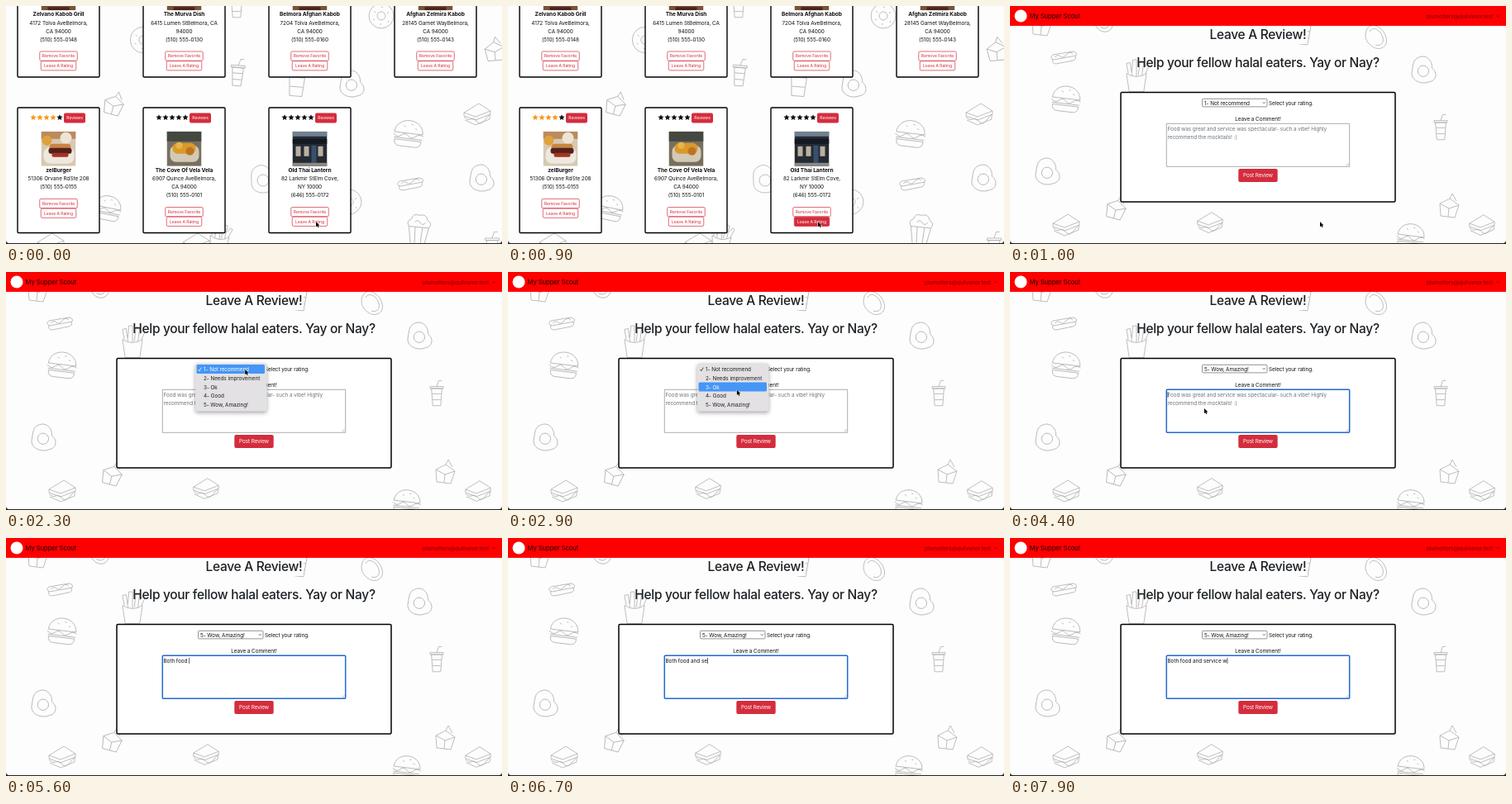
Animation of 600 by 288 pixels, one loop 8000 ms. Source, as an HTML page with a canvas:

```html
<!DOCTYPE html>
<html lang="en">
<head>
<meta charset="utf-8">
<title>Leave a review</title>
<style>
html, body { margin: 0; width: 100%; height: 100%; overflow: hidden; background: #fff; }
canvas { display: block; width: 600px; height: 288px; }
</style>
</head>
<body>
<canvas id="stage"></canvas>
<script>
const W = 600, H = 288, LOOP = 8000, STEP = 100;
const RED = '#d42d3d', INK = '#111', PAGE = '#fdfdfd';
const canvas = document.getElementById('stage');
const dpr = window.devicePixelRatio || 1;
canvas.width = W * dpr;
canvas.height = H * dpr;
const c = canvas.getContext('2d');

const clamp = v => Math.max(0, Math.min(1, v));
const ease = v => v * v * (3 - 2 * v);

function text(str, x, y, o = {}) {
  const { size = 6.4, weight = 400, color = INK, align = 'left', track = -0.01 } = o;
  c.font = `${weight} ${size}px Inter, "Open Sans", sans-serif`;
  c.letterSpacing = track * size + 'px';
  c.textAlign = align;
  c.fillStyle = color;
  c.fillText(str, x, y + size * 0.36);
  return c.measureText(str).width;
}

function box(x, y, w, h, r, fill, stroke, line = 1) {
  c.beginPath();
  c.roundRect(x, y, w, h, r);
  if (fill) { c.fillStyle = fill; c.fill(); }
  if (stroke) { c.strokeStyle = stroke; c.lineWidth = line; c.stroke(); }
}

function disc(x, y, r, fill) {
  c.beginPath();
  c.arc(x, y, r, 0, Math.PI * 2);
  c.fillStyle = fill;
  c.fill();
}

function line(path, color, width) {
  c.strokeStyle = color;
  c.lineWidth = width;
  c.stroke(new Path2D(path));
}

// Background doodles, each drawn around its own centre.
const doodles = {
  burger: 'M-16 0C-15-19 15-19 16 0ZM-17 2Q-12 7-8 3T0 3T8 3T17 2M-16 6H16M-15 8Q-15 15-9 15H9Q15 15 15 8ZM-6-8l2 1M2-10h2M7-6l2 1',
  fries: 'M-11-4L-8 16H8L11-4Q0 3-11-4ZM-9-4L-11-15L-7-16L-5-2M-5-6L-4-19H0V-1M2-2L4-18L8-17L6-2M8-10L12-15L14-13L10-4',
  egg: 'M-10-15C0-22 9-12 9-5C18-1 18 10 9 13C0 19-16 16-15 3C-15-3-17-11-10-15ZM6 1A7 7 0 1 1-8 1A7 7 0 1 1 6 1',
  carton: 'M-10-5L2-11L13-3L8 12L-9 10ZM-10-5L1 1L13-3M1 1L0 11M2-11L5-17L10-8',
  sandwich: 'M-16-3L2-14L16-5L-2 2ZM-16-3V1L-2 6L16-1V-5M-16 2Q-12 7-8 5T0 8T10 5T16 1M-15 6L-2 12L15 5V1',
  drink: 'M-8-10H8L6 16H-6ZM-10-13H10V-10H-10ZM0-13L3-22H8M-7-2H7M-6 7H6',
  donut: 'M15 0A15 15 0 1 1-15 0A15 15 0 1 1 15 0M5 0A5 5 0 1 1-5 0A5 5 0 1 1 5 0M-9-6l2 2M0-11l2 1M9-5l-2 2M8 6l1 2M-2 10h2M-10 4l2 1',
  hotdog: 'M-13-3L11-7Q17-6 15-2L-12 3Q-18 1-13-3ZM-13 2Q-15 8-9 8L11 4Q16 3 14-2M-11 0Q-7-4-4-1T3-3T11-4',
  popcorn: 'M-11-4L-7 18H7L11-4ZM-4-4L-3 18M4-4L3 18M-11-4Q-15-10-9-12Q-8-19-1-17Q7-20 9-12Q15-10 11-4M-5-9q3-4 6 0t6-1',
  potato: 'M-12-8C-8-20 8-14 12 0C15 12 4 16-3 12C-11 8-15 0-12-8ZM-8-7C-5-14 5-10 8 0C10 8 4 11-1 9'
};

function doodle([kind, x, y, scale = 1, turn = 0]) {
  c.save();
  c.translate(x, y);
  c.rotate(turn);
  c.scale(scale, scale);
  line(doodles[kind], '#a8a8a8', 0.75 / scale);
  c.restore();
}

const listArt = [
  ['donut', 166, 41, 1.05], ['drink', 279, 1, 0.8], ['donut', 454, 12],
  ['carton', 590, 55, 1, -0.2], ['drink', 280, 83, 0.85, 0.08], ['drink', 352, 89, 1.25, 0.08],
  ['carton', 129, 120, 1, 0.15], ['egg', 419, 95, 0.95, 0.2], ['burger', 487, 154, 1.08, 0.12],
  ['sandwich', 570, 132], ['hotdog', 489, 215], ['egg', 576, 209, 0.95, 0.2],
  ['egg', 312, 210], ['donut', 415, 237], ['burger', 123, 244, 1, 0.2],
  ['popcorn', 499, 272, 1.1, 0.1], ['fries', 258, 283, 1.05, 0.1],
  ['sandwich', 54, 289], ['sandwich', 230, 289], ['drink', 588, 292, 0.85]
];
const formArt = [
  ['carton', 37, 24], ['potato', 113, 17, 1, 0.3], ['hotdog', 65, 62], ['fries', 153, 86, 1.1],
  ['burger', 68, 112, 1.05, 0.12], ['egg', 46, 201, 0.95, 0.2], ['carton', 127, 246, 1, 0.15],
  ['sandwich', 68, 266], ['sandwich', 242, 263, 0.95], ['drink', 356, 32, 0.9, 0.1],
  ['potato', 443, 38], ['egg', 501, 78, 0.95, 0.2], ['drink', 521, 149, 0.8],
  ['carton', 530, 244], ['sandwich', 571, 266, 0.95], ['burger', 485, 278, 1, 0.12]
];

function button(label, x, y, w, fillAmount = 0) {
  box(x - w / 2, y - 5.6, w, 11.2, 1.6, '#fff', RED, 0.7);
  if (fillAmount) {
    c.globalAlpha = fillAmount;
    box(x - w / 2, y - 5.6, w, 11.2, 1.6, RED);
    c.globalAlpha = 1;
  }
  text(label, x, y, { size: 5.1, align: 'center', color: fillAmount > 0.5 ? '#fff' : RED });
}

function star(x, y, color) {
  c.beginPath();
  for (let i = 0; i < 10; i++) {
    const a = -Math.PI / 2 + i * Math.PI / 5, r = i % 2 ? 1.75 : 3.8;
    c.lineTo(x + r * Math.cos(a), y + r * Math.sin(a));
  }
  c.fillStyle = color;
  c.fill();
}

const fillRect = (color, x, y, w, h) => { c.fillStyle = color; c.fillRect(x, y, w, h); };

const photos = {
  burger() {
    fillRect('#d8c8b2', 0, 0, 42, 42);
    fillRect('#b98c5d', 0, 0, 42, 9);
    disc(7, 11, 6, '#e0a13c');
    disc(30, 8, 7, '#eee4d5');
    box(3, 19, 37, 20, 8, '#eee8df');
    box(10, 15, 26, 8, 4, '#c88443');
    box(9, 20, 28, 7, 3, '#54201a');
    box(13, 26, 20, 5, 2, '#a33325');
  },
  plate() {
    fillRect('#77705f', 0, 0, 42, 42);
    fillRect('#454840', 0, 0, 42, 12);
    box(4, 17, 35, 20, 7, '#d3c9b5');
    box(7, 14, 28, 13, 6, '#d99a2b');
    disc(15, 17, 4, '#e9b44b');
    disc(28, 24, 5, '#bd7420');
  },
  shop() {
    fillRect('#252a33', 0, 0, 42, 42);
    fillRect('#71808e', 0, 0, 42, 6);
    fillRect('#141820', 0, 9, 42, 6);
    for (const x of [4, 14, 31]) fillRect('#b9b0a0', x, 18, 6, 12);
    fillRect('#36506d', 23, 17, 6, 21);
    fillRect('#8b8983', 0, 38, 42, 4);
  },
  dish() {
    fillRect('#76543a', 0, 0, 42, 42);
    fillRect('#4a2420', 8, 38, 26, 4);
  }
};

function photo(kind, x, y) {
  c.save();
  c.translate(x, y);
  c.beginPath();
  c.rect(0, 0, 42, 42);
  c.clip();
  photos[kind]();
  c.restore();
}

const topCards = [
  ['Zelvano Kabob Grill', '4172 Tolva AveBelmora,', 'CA 94000', '(510) 555-0148'],
  ['The Murva Dish', '6415 Lumen StBelmora, CA', '94000', '(510) 555-0130'],
  ['Belmora Afghan Kabob', '7204 Tolva AveBelmora,', 'CA 94000', '(510) 555-0160'],
  ['Afghan Zelmira Kabob', '28145 Garnet WayBelmora,', 'CA 94000', '(510) 555-0143']
];
const lowCards = [
  ['zelBurger', '51306 Orvane RdSte 208', '(510) 555-0155'],
  ['The Cove Of Vela Vela', '6907 Quince AveBelmora,', 'CA 94000', '(510) 555-0101'],
  ['Old Thai Lantern', '82 Larkmir StElm Cove,', 'NY 10000', '(646) 555-0172']
];
const lowPhotos = ['burger', 'plate', 'shop'];

function card(lines, i, top, pic, rated, hover) {
  const x = 63.5 + i * 152;
  box(x - 49.5, top + 1, 99, 151.5, 1.2, '#fff', '#000', 1.4);
  for (let k = 0; k < 5; k++) star(x - 30.5 + k * 8, top + 13, k < rated ? '#ff9518' : '#111');
  box(x + 6.5, top + 7.5, 26, 12, 2, RED);
  text('Reviews', x + 19.6, top + 13.6, { size: 5.1, color: '#fff', align: 'center' });
  photo(pic, x - 21, top + 29.8);
  lines.forEach((str, n) => text(str, x, top + 76.6 + n * 10.1, {
    align: 'center', size: n ? 6.4 : 6.6, weight: n ? 400 : 700
  }));
  const y = top + 86.7 + lines.length * 10.1;
  button('Remove Favorite', x, y, 45.5);
  button('Leave A Rating', x, y + 11.7, 42.5, hover);
}

function listPage(t) {
  listArt.forEach(doodle);
  topCards.forEach((lines, i) => card(lines, i, -66.5, 'dish', 0, 0));
  lowCards.forEach((lines, i) =>
    card(lines, i, 122, lowPhotos[i], i ? 0 : 4, i === 2 ? clamp(t / 150) : 0));
}

const ratings = ['1- Not recommend', '2- Needs improvement', '3- Ok', '4- Good', '5- Wow, Amazing!'];
const comment = 'Both food and service w';
const OPEN = 1900, PICK = 3350, CHOSEN = 3600, FOCUS = 4200, TYPE = 4500, RESUME = 5600;

const typed = t => t < TYPE ? 0
  : t < RESUME ? Math.ceil((t - TYPE) / (RESUME - TYPE) * 10)
  : 10 + Math.floor((t - RESUME) / 176);

function menu(t, pointer) {
  const alpha = t < PICK ? 1 : 1 - (t - PICK) / 230;
  if (t < OPEN || alpha <= 0) return;
  const current = Math.max(0, Math.min(4, Math.floor((pointer.y - 112) / 10.8)));
  c.save();
  c.globalAlpha = alpha;
  c.shadowColor = 'rgba(0,0,0,.35)';
  c.shadowBlur = 5;
  c.shadowOffsetY = 2;
  box(229, 110.5, 86.5, 58, 2.5, '#e3e1e3');
  c.shadowColor = 'transparent';
  box(230.5, 112 + current * 10.8, 82.5, 11, 1.5, '#4596f7');
  ratings.forEach((str, i) =>
    text(str, 239, 117.6 + i * 10.8, { color: i === current ? '#fff' : '#222' }));
  line('M232.5 118l1.3 1.7l2.5-4', current ? '#222' : '#fff', 0.8);
  c.restore();
}

function formPage(t, pointer) {
  formArt.forEach(doodle);
  fillRect('#f00', 0, 0, W, 24);
  disc(13, 12, 7.5, '#fff');
  text('My Supper Scout', 23.5, 12.6, { size: 7.7, color: '#1c0000' });
  text('plumotters@quilvanor.test', 584, 12.6, { size: 6.6, color: '#780000', align: 'right' });
  line('M588.5 11.5l1.7 1.7l1.7-1.7', '#780000', 0.9);

  const head = { size: 15.5, weight: 500, align: 'center', track: -0.02, color: '#1c2024' };
  fillRect(PAGE, 240, 24, 120, 22);
  text('Leave A Review!', 300, 34, head);
  text('Help your fellow halal eaters. Yay or Nay?', 300, 68, head);

  box(134, 104.5, 332, 132.5, 1.5, '#fff', '#000', 1.5);
  box(232.5, 112.3, 78.5, 9.6, 1.2, '#fff', '#666', 0.7);
  text(ratings[t < CHOSEN ? 0 : 4], 235, 117.2);
  line('M305.7 116.3l1.5 1.5l1.5-1.5', '#333', 0.7);
  text('Select your rating.', 313, 117.2);
  text('Leave a Comment!', 300, 137, { align: 'center' });

  const focus = t >= FOCUS;
  box(189.3, 142.3, 221.4, 52, focus ? 1 : 0, '#fff', focus ? '#2169cf' : '#888', focus ? 1.5 : 0.7);
  line('M406.5 193l3-3M408.3 193l1.2-1.2', '#888', 0.5);
  const count = typed(t);
  let caret = 190.5;
  if (count) {
    caret += text(comment.slice(0, count), 190.5, 148.4);
  } else {
    const hint = { color: '#6c757d' };
    text('Food was great and service was spectacular- such a vibe! Highly', 190.5, 148.4, hint);
    text('recommend the mocktails! :)', 190.5, 158.4, hint);
  }
  if (focus) fillRect('#000', caret + 0.2, 144.8, 0.6, 7.2);

  box(276.3, 197, 47.4, 16, 2, RED);
  text('Post Review', 300, 205.1, { color: '#fff', align: 'center' });
  menu(t, pointer);
}

const path = [
  [0, 375, 261], [1200, 375, 261], [1800, 290, 118], [2500, 289, 118],
  [3200, 269, 159], [3700, 269, 159], [4150, 235, 165], [LOOP, 235, 165]
];

function pointerAt(t) {
  const i = path.findIndex((p, k) => k && t <= p[0]);
  const [t0, x0, y0] = path[i - 1], [t1, x1, y1] = path[i];
  const k = ease((t - t0) / (t1 - t0));
  return { x: x0 + (x1 - x0) * k, y: y0 + (y1 - y0) * k };
}

function arrow({ x, y }) {
  c.save();
  c.translate(x, y);
  const shape = new Path2D('M0 0V6.2L1.5 4.9L2.5 7.1L3.5 6.7L2.6 4.5H4.5Z');
  c.strokeStyle = '#fff';
  c.lineWidth = 0.9;
  c.stroke(shape);
  c.fillStyle = '#000';
  c.fill(shape);
  c.restore();
}

// Dark surround showing below the window and at its rounded corners.
function windowEdge() {
  c.beginPath();
  c.rect(0, 270, W, 18);
  c.roundRect(0, 270, W, 17, [0, 0, 4, 4]);
  c.fillStyle = '#222';
  c.fill('evenodd');
}

function draw(t) {
  c.setTransform(dpr, 0, 0, dpr, 0, 0);
  fillRect(PAGE, 0, 0, W, H);
  c.lineJoin = 'round';
  const pointer = pointerAt(t);
  if (t < 1000) listPage(t);
  else formPage(t, pointer);
  if (t < TYPE) arrow(pointer);
  windowEdge();
}

const start = performance.now();
function tick() {
  const t = (performance.now() - start) % LOOP;
  draw(Math.floor(t / STEP) * STEP);
  requestAnimationFrame(tick);
}
tick();
</script>
</body>
</html>
```
